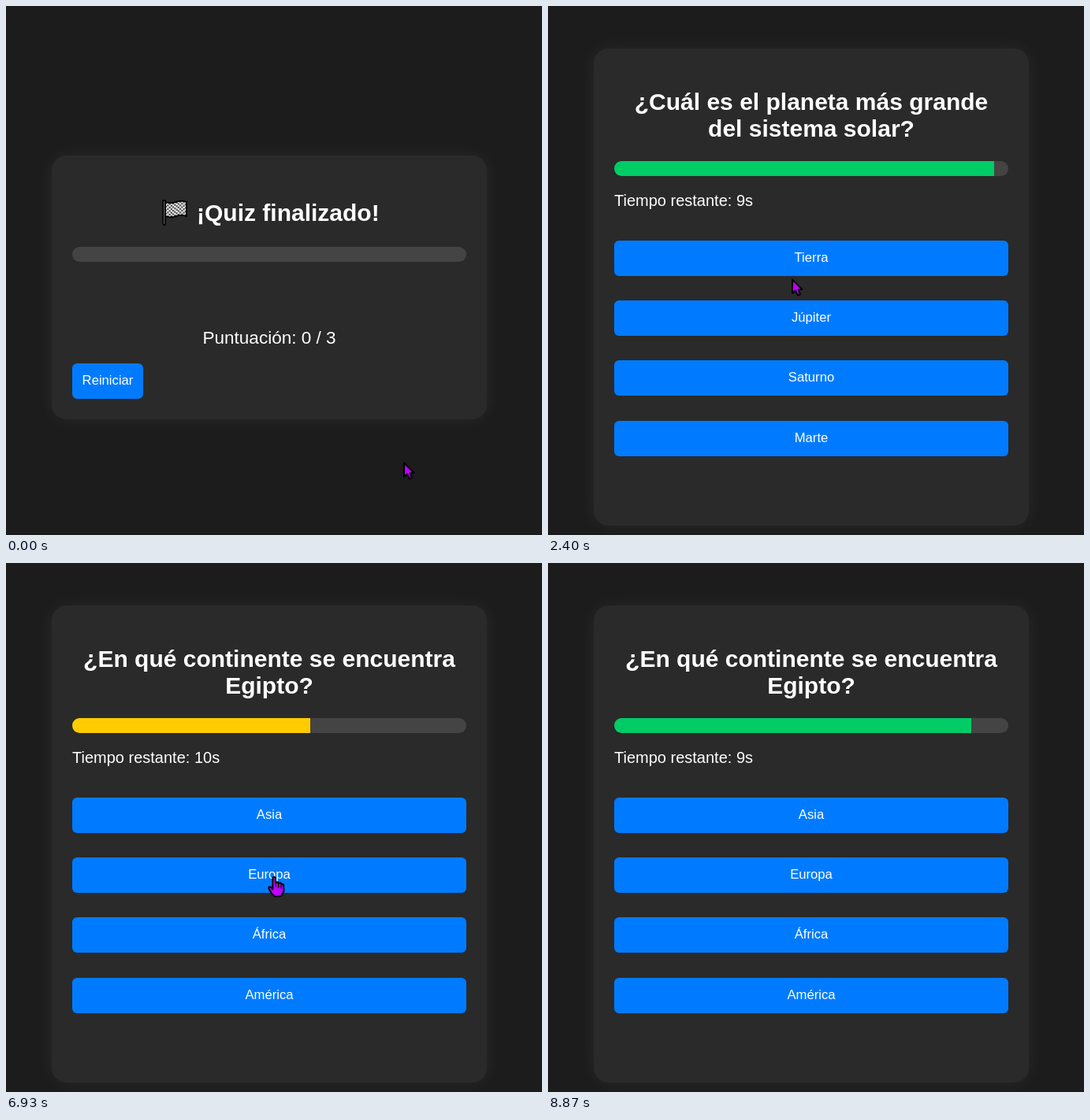
An HTML page with a canvas that plays this animation: 680 px wide and 672 px high, repeating every 8.94 s.

```html
<!DOCTYPE html>
<html lang="es">
<head>
<meta charset="utf-8">
<title>Quiz</title>
<style>
html, body { margin: 0; width: 100%; height: 100%; overflow: hidden; background: #1c1c1c; }
canvas { display: block; }
</style>
</head>
<body>
<canvas id="stage" width="680" height="672"></canvas>
<script>
const ctx = document.getElementById('stage').getContext('2d');
const FONT = '"Liberation Sans", Arial, sans-serif';
const LOOP = 8940, FRAME = 1000 / 15, LAST = 133;
const MID = 334, LEFT = 84, WIDTH = 500;
const BLUE = '#007bff', DARK_BLUE = '#0056b3', PURPLE = '#bf00ff';
const RED = '#ff3333', GREEN = '#00cc66', YELLOW = '#ffcc00';
const ROWS = [298, 374, 450, 527];

const PLANET = {
  title: ['¿Cuál es el planeta más grande', 'del sistema solar?'],
  options: ['Tierra', 'Júpiter', 'Saturno', 'Marte'],
  hover: true
};
const CONTINENT = {
  title: ['¿En qué continente se encuentra', 'Egipto?'],
  options: ['Asia', 'Europa', 'África', 'América'],
  hover: false
};

// start time, seconds left, bar from %, bar to %, colour
const TICKS = [
  [1030, 10, 0, 100, RED],
  [2040, 9, 100, 90, GREEN],
  [3040, 8, 90, 80, GREEN],
  [4050, 7, 80, 70, GREEN],
  [5030, 6, 70, 60, YELLOW],
  [6920, 10, 60, 100, YELLOW],
  [7930, 9, 100, 90, GREEN]
];
const QUIZ_START = 1030, ANSWERED = 5420, NEXT = 6920;

// time, x, y of the pointer tip
const POINTER = [
  [0, 505, 580], [930, 114, 460], [1130, 114, 460], [2000, 302, 386],
  [2200, 310, 347], [4530, 310, 347], [4700, 325, 341], [4930, 340, 397],
  [6920, 340, 397], [7330, 243, 535], [7700, 215, 690]
];

function pointerAt(t) {
  const i = POINTER.findIndex(p => p[0] > t);
  if (i < 0) return POINTER[POINTER.length - 1].slice(1);
  const [t0, x0, y0] = POINTER[i - 1], [t1, x1, y1] = POINTER[i];
  const u = (t - t0) / (t1 - t0), e = u * u * (3 - 2 * u);
  return [x0 + (x1 - x0) * e, y0 + (y1 - y0) * e];
}

function text(str, x, y, size, { align = 'center', weight = 'normal', color = '#fff' } = {}) {
  ctx.font = `${weight} ${size}px ${FONT}`;
  ctx.textAlign = align;
  ctx.fillStyle = color;
  ctx.fillText(str, x, y);
}

function box(x, y, w, h, r, color) {
  ctx.beginPath();
  ctx.roundRect(x, y, w, h, r);
  ctx.fillStyle = color;
  ctx.fill();
}

function card(top, bottom) {
  ctx.save();
  ctx.shadowColor = 'rgba(255,255,255,0.06)';
  ctx.shadowBlur = 25;
  box(58, top, 552, bottom - top, 18.75, '#2a2a2a');
  ctx.restore();
}

function bar(y, percent, color) {
  box(LEFT, y, WIDTH, 19, 9.5, '#444');
  if (!percent) return;
  ctx.save();
  ctx.clip();
  ctx.fillStyle = color;
  ctx.fillRect(LEFT, y, WIDTH * percent / 100, 19);
  ctx.restore();
}

function inside([x, y], top, width) {
  return x >= LEFT && x < LEFT + width && y >= top && y < top + 45;
}

function button(label, top, width, hot) {
  box(LEFT, top, width, 45, 6.25, hot ? DARK_BLUE : BLUE);
  text(label, LEFT + width / 2, top + 27, 16.67);
}

function flag() {
  const wave = u => Math.sin(u * Math.PI * 2) * 1.3;
  const cols = 12, rows = 8, w = 27 / cols, h = 18 / rows;
  ctx.beginPath();
  for (let i = 0; i <= cols; i++) ctx.lineTo(202 + i * w, 249 + wave(i / cols));
  for (let i = cols; i >= 0; i--) ctx.lineTo(202 + i * w, 267 + wave(i / cols));
  ctx.closePath();
  ctx.fillStyle = '#f2f2f2';
  ctx.fill();
  ctx.fillStyle = '#555';
  for (let i = 0; i < cols; i++)
    for (let j = i % 2; j < rows; j += 2)
      ctx.fillRect(202 + i * w, 249 + j * h + wave((i + 0.5) / cols), w, h);
  ctx.strokeStyle = '#000';
  ctx.lineWidth = 2;
  ctx.stroke();
  box(198.5, 246, 4.5, 33, 2, '#000');
  box(200.2, 248, 1, 29, 0, '#777');
}

function outline(points) {
  ctx.beginPath();
  points.forEach(p => ctx.lineTo(...p));
  ctx.closePath();
  ctx.fillStyle = PURPLE;
  ctx.strokeStyle = '#000';
  ctx.lineWidth = 2;
  ctx.lineJoin = 'round';
  ctx.fill();
  ctx.stroke();
}

function arrow() {
  outline([[0, 0], [0, 17.5], [4, 14], [7, 20], [10, 18.8], [7.6, 13], [12.5, 12.5]]);
}

function hand() {
  outline([
    [-1.5, 2], [0, 1], [1.8, 2], [2, 8.5], [5, 8], [6, 9], [8.5, 9], [9.5, 10.2],
    [12, 11], [12.5, 19], [9.5, 25], [6, 26], [1, 26], [-2.5, 23], [-6.5, 16.5],
    [-6.5, 14], [-4.5, 14], [-1.7, 17]
  ]);
  ctx.beginPath();
  for (const [x, y] of [[2.2, 8], [5.7, 9], [9.2, 10]]) {
    ctx.moveTo(x, y);
    ctx.lineTo(x, y + 6);
  }
  ctx.lineWidth = 1.5;
  ctx.stroke();
}

function drawPointer([x, y], overButton) {
  ctx.save();
  ctx.translate(Math.round(x), Math.round(y) + 0.5);
  (overButton ? hand : arrow)();
  ctx.restore();
}

function drawResult(tip) {
  const over = inside(tip, 454, 90);
  card(190, 525);
  flag();
  text('¡Quiz finalizado!', 242, 273, 30, { align: 'left', weight: 'bold' });
  bar(306, 0);
  text('Puntuación: 0 / 3', MID, 429, 22.5);
  button('Reiniciar', 454, 90, over);
  return over;
}

function drawQuestion(t, tip) {
  const quiz = t < NEXT ? PLANET : CONTINENT;
  const [start, left, from, to, color] = TICKS.filter(k => k[0] <= t).pop();
  const u = Math.min(1, (t - start) / 1000);
  card(54, 660);
  quiz.title.forEach((line, i) => text(line, MID, 132 + 34 * i, 30, { weight: 'bold' }));
  bar(197, from + (to - from) * u, color);
  text(`Tiempo restante: ${left}s`, LEFT, 254, 20, { align: 'left' });
  const hit = ROWS.findIndex(top => inside(tip, top, WIDTH));
  ROWS.forEach((top, i) => button(quiz.options[i], top, WIDTH, quiz.hover && i === hit));
  if (t >= ANSWERED && t < NEXT) text('¡Correcto!', MID, 606, 20, { color: GREEN });
  return hit >= 0;
}

// The picture advances at 15 steps per second, on 10 ms marks.
const mark = k => Math.round(k * FRAME / 10) * 10;
function step(ms) {
  let k = Math.min(LAST, Math.ceil(ms / FRAME));
  while (mark(k) > ms) k--;
  return mark(k);
}

function draw(ms) {
  const t = step(ms % LOOP), tip = pointerAt(t);
  ctx.fillStyle = '#1c1c1c';
  ctx.fillRect(0, 0, 680, 672);
  const over = t < QUIZ_START ? drawResult(tip) : drawQuestion(t, tip);
  drawPointer(tip, over);
}

const begin = performance.now();
function loop() {
  draw(Math.max(0, performance.now() - begin));
  requestAnimationFrame(loop);
}
loop();
</script>
</body>
</html>
```
